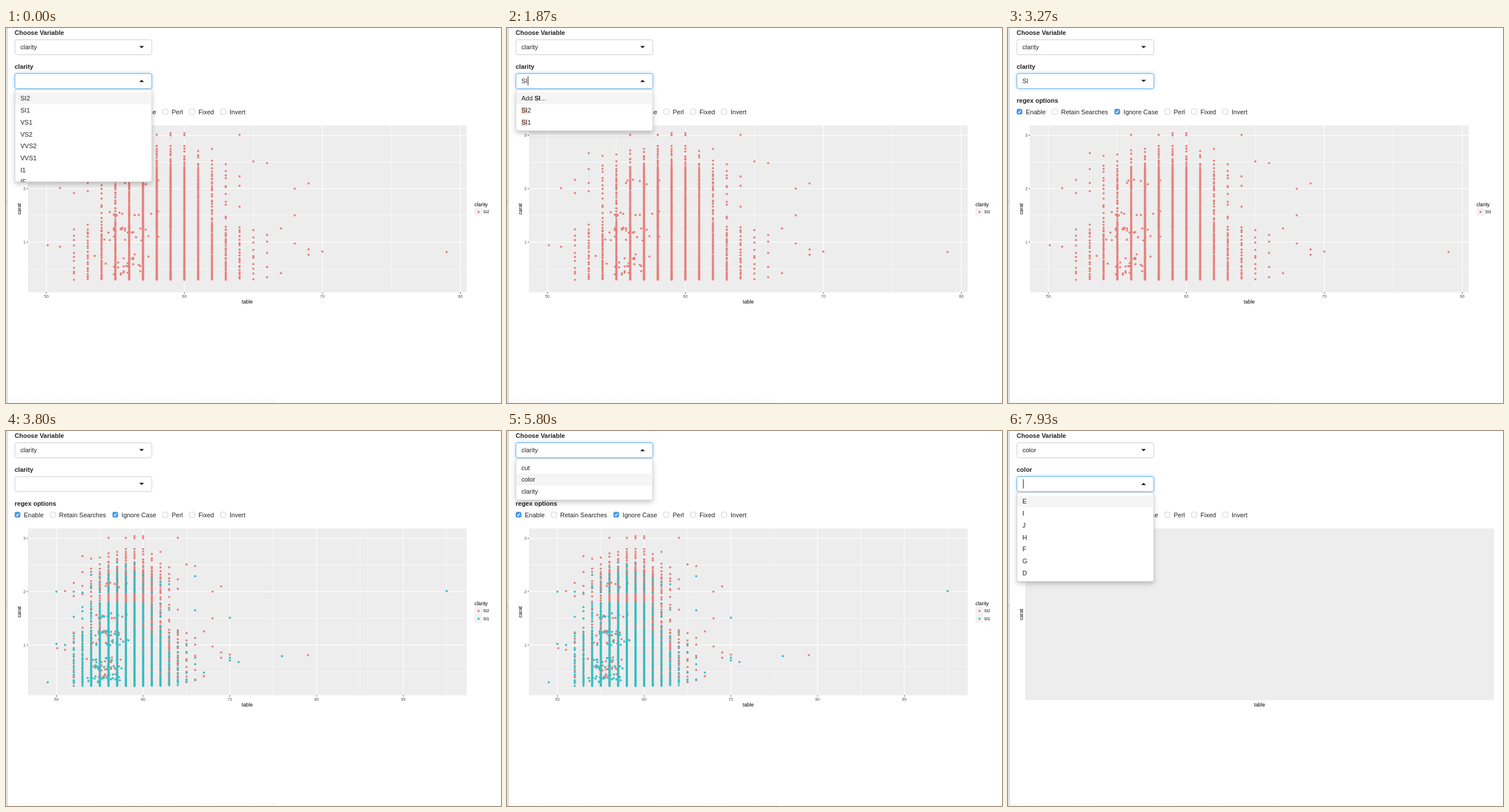
Recreate the animation shown at these times as an HTML page with a canvas. Size 859x652 px, loop 8 s.

```html
<!DOCTYPE html>
<html lang="en">
<head>
<meta charset="utf-8">
<title>Regex select</title>
<style>
html, body { margin: 0; width: 100%; height: 100%; overflow: hidden; background: #fff; }
canvas { display: block; }
</style>
</head>
<body>
<canvas id="stage" width="859" height="652"></canvas>
<script>
const W = 859, H = 652, LOOP = 8000;
const FONT = '"Liberation Sans", Arial, sans-serif';
const INK = '#222', RED = '#e8807b', TEAL = '#38c0c6', PANEL = '#ededed';
const stage = document.getElementById('stage').getContext('2d');

// Moments of the interaction, in ms
const T = { s: 1500, si: 1700, enter: 2700, apply: 3600, open: 5200, hover: 5700,
            pick: 6000, redraw: 6150, open2: 7450 };

let seed = 7;
function rnd() {
  seed = (seed * 16807) % 2147483647;
  return seed / 2147483647;
}

function text(c, str, x, y, opt = {}) {
  c.font = `${opt.bold ? 'bold ' : ''}${opt.size || 11}px ${FONT}`;
  c.fillStyle = opt.color || INK;
  c.textAlign = opt.align || 'left';
  c.textBaseline = 'alphabetic';
  c.fillText(str, x, y + (opt.size || 11) * 0.36);
  return c.measureText(str).width;
}

function rect(c, color, x, y, w, h) {
  c.fillStyle = color;
  c.fillRect(x, y, w, h);
}

function roundRect(c, x, y, w, h, r) {
  c.beginPath();
  c.roundRect(x, y, w, h, r);
}

function dot(c, color, x, y) {
  c.fillStyle = color;
  c.beginPath();
  c.arc(x, y, 1.9, 0, 7);
  c.fill();
}

// ---------- scatter data ----------

// Each carat band fills the whole-number tables along a bell curve.
function buildSeries({ color, centre, bands, clusters, strays, outliers }) {
  const pts = outliers.map(([table, carat]) => ({ table, carat, color }));
  for (const { from, to, peak, spread } of bands) {
    for (let table = 52; table <= 68; table++) {
      const n = Math.round(peak * Math.exp(-(((table - centre) / spread) ** 2)));
      for (let i = 0; i < n; i++) {
        const u = ((i + rnd()) / n) ** 1.2;
        pts.push({ table, carat: from + (to - from) * u, color });
      }
    }
  }
  for (let i = 0; i < strays; i++) {
    const table = 53.3 + Math.round((rnd() + rnd()) * 26) / 10;
    const carat = clusters[Math.floor(rnd() * clusters.length)] + rnd() * 0.1 - 0.03;
    pts.push({ table, carat, color });
  }
  return pts;
}

const si2 = buildSeries({
  color: RED, centre: 58.4, strays: 75,
  bands: [
    { from: 0.29, to: 1.27, peak: 95, spread: 4.4 },
    { from: 1.27, to: 1.97, peak: 75, spread: 2.9 },
    { from: 1.98, to: 2.4, peak: 42, spread: 3.1 },
    { from: 2.4, to: 2.75, peak: 10, spread: 3.2 }
  ],
  clusters: [0.4, 0.55, 0.7, 0.7, 1.05, 1.2, 1.2, 1.52, 2.1],
  outliers: [[50.1, 0.94], [51, 2.01], [51, 0.91], [56, 3.01], [58, 3.01], [59, 3.04],
    [59, 3], [60, 3.04], [60, 3], [64, 3.01], [58, 2.8], [59, 2.8], [60, 2.8], [65, 2.51],
    [66, 2.48], [68, 2], [68, 1.5], [69, 2.1], [69, 0.86], [69, 0.76], [70, 0.82], [79, 0.81]]
});

const si1 = buildSeries({
  color: TEAL, centre: 57.7, strays: 75,
  bands: [
    { from: 0.23, to: 0.75, peak: 62, spread: 4.5 },
    { from: 0.75, to: 1.28, peak: 54, spread: 4 },
    { from: 1.28, to: 1.48, peak: 14, spread: 2.5 },
    { from: 1.48, to: 1.8, peak: 32, spread: 3 },
    { from: 1.98, to: 2.35, peak: 16, spread: 2.9 },
    { from: 2.36, to: 2.58, peak: 3, spread: 2 }
  ],
  clusters: [0.32, 0.38, 0.55, 0.7, 1.02, 1.2, 1.54],
  outliers: [[49, 0.3], [50, 2], [50, 1.02], [51, 1], [52, 2], [66, 2.29], [66, 1.65],
    [70, 1.51], [70, 0.76], [70, 0.71], [71, 0.68], [76, 0.79], [95, 2.01]]
});

// Mix the drawing order, with the second series mostly in front
const both = [...si2, ...si1]
  .map(p => ({ p, key: rnd() + (p.color === TEAL ? 0.6 : 0) }))
  .sort((a, b) => a.key - b.key)
  .map(o => o.p);

// ---------- plots ----------

function axisTitles(c, x, y) {
  text(c, 'table', x, 476, { size: 8.8, align: 'center', color: '#000' });
  c.save();
  c.translate(23, y);
  c.rotate(-Math.PI / 2);
  text(c, 'carat', 0, 0, { size: 8.8, align: 'center', color: '#000' });
  c.restore();
}

function makePlot(points, x50, unit, lastTick, levels) {
  const layer = document.createElement('canvas');
  layer.width = W;
  layer.height = H;
  const c = layer.getContext('2d');
  const left = 38, top = 169.5, width = 761.5, height = 290;
  const px = t => x50 + (t - 50) * unit;
  const py = v => 464.7 - 92.7 * v;
  const tick = { size: 7, color: '#4d4d4d' };

  rect(c, PANEL, left, top, width, height);
  for (let t = 50; px(t) < left + width; t += 5) {
    const w = t % 10 ? 0.6 : 1.2;
    rect(c, '#fff', px(t) - w / 2, top, w, height);
  }
  for (let v = 0.5; v <= 3; v += 0.5) {
    const w = v % 1 ? 0.6 : 1.2;
    rect(c, '#fff', left, py(v) - w / 2, width, w);
  }
  for (const p of points) dot(c, p.color, px(p.table), py(p.carat));
  for (let t = 50; t <= lastTick; t += 10) {
    rect(c, '#333', px(t) - 0.5, top + height, 1, 2.2);
    text(c, String(t), px(t), 466.3, { ...tick, align: 'center' });
  }
  for (let v = 1; v <= 3; v++) {
    rect(c, '#333', left - 2.2, py(v) - 0.5, 2.2, 1);
    text(c, String(v), 34, py(v), { ...tick, align: 'right' });
  }
  axisTitles(c, 418.5, 314.5);

  const first = 319.7 - (levels.length - 1) * 6.8;
  text(c, 'clarity', 813, first - 13.2, { size: 8.8, color: '#000' });
  levels.forEach(([label, color], i) => {
    const y = first + i * 13.6;
    rect(c, '#f2f2f2', 813, y - 6.8, 13.6, 13.6);
    dot(c, color, 820, y);
    text(c, label, 828, y, { size: 7, color: '#000' });
  });
  return layer;
}

const plotOne = makePlot(si2, 70, 23.95, 80, [['SI2', RED]]);
const plotTwo = makePlot(both, 87.5, 15.05, 90, [['SI2', RED], ['SI1', TEAL]]);

function emptyPlot(c) {
  rect(c, PANEL, 30, 169.5, 813.5, 298.5);
  axisTitles(c, 436.5, 319);
}

// ---------- form ----------

function select(c, y, value, focus, open) {
  c.save();
  if (focus) {
    c.shadowColor = 'rgba(102,175,233,.7)';
    c.shadowBlur = 6;
  }
  roundRect(c, 15.5, y, 237.5, 26, 3);
  c.fillStyle = '#fff';
  c.fill();
  c.restore();
  c.strokeStyle = focus ? '#66afe9' : '#ccc';
  c.lineWidth = 1;
  c.stroke();
  text(c, value, 25, y + 13);

  const d = open ? -2 : 2, my = y + 12.8;
  c.fillStyle = INK;
  c.beginPath();
  c.moveTo(231.2, my - d);
  c.lineTo(239.4, my - d);
  c.lineTo(235.3, my + d);
  c.fill();
}

function caret(c, x, y) {
  rect(c, INK, Math.round(x), y + 5, 1, 16);
}

function option(c, item, y, term) {
  const i = term ? item.indexOf(term) : -1;
  if (i >= 0) {
    c.font = `11px ${FONT}`;
    const x = 25 + c.measureText(item.slice(0, i)).width;
    rect(c, '#f8d5c9', x, y - 6, c.measureText(term).width, 12.5);
  }
  text(c, item, 25, y);
}

function dropdown(c, top, items, active, term) {
  const row = 20.7, start = top + 4.7;
  const total = items.length + (term ? 1 : 0);
  const h = Math.min(total * row + 9.3, 160);
  c.save();
  c.shadowColor = 'rgba(0,0,0,.22)';
  c.shadowBlur = 9;
  c.shadowOffsetY = 4;
  roundRect(c, 15.5, top, 237.5, h, [0, 0, 3, 3]);
  c.fillStyle = '#fff';
  c.fill();
  c.restore();
  c.strokeStyle = '#d0d0d0';
  c.lineWidth = 1;
  c.stroke();

  c.save();
  c.clip();
  rect(c, '#f5f5f5', 16, start + active * row, 236.5, row);
  let y = start + row / 2;
  if (term) {
    let x = 25 + text(c, 'Add ', 25, y);
    x += text(c, term, x, y, { bold: true });
    text(c, '…', x, y);
    y += row;
  }
  for (const item of items) {
    option(c, item, y, term);
    y += row;
  }
  c.restore();
}

function checkbox(c, x, label, on) {
  roundRect(c, x - 4.5, 141, 9, 9, 2);
  c.fillStyle = on ? '#459ae9' : '#fff';
  c.fill();
  c.strokeStyle = on ? '#3f8fdc' : '#c2c2c2';
  c.lineWidth = 0.8;
  c.stroke();
  if (on) {
    c.strokeStyle = '#fff';
    c.lineWidth = 1.3;
    c.beginPath();
    c.moveTo(x - 2.3, 145.7);
    c.lineTo(x - 0.6, 147.7);
    c.lineTo(x + 2.4, 143);
    c.stroke();
  }
  return text(c, label, x + 11, 145.7);
}

const checks = ['Enable', 'Retain Searches', 'Ignore Case', 'Perl', 'Fixed', 'Invert'];
const checked = ['Enable', 'Ignore Case'];
const clarity = ['SI2', 'SI1', 'VS1', 'VS2', 'VVS2', 'VVS1', 'I1', 'IF'];
const colors = ['E', 'I', 'J', 'H', 'F', 'G', 'D'];
const variables = ['cut', 'color', 'clarity'];

function options(c) {
  text(c, 'regex options', 15, 126, { bold: true });
  let x = 20;
  for (const label of checks) x += checkbox(c, x, label, checked.includes(label)) + 27;
}

function page(c) {
  rect(c, '#fff', 0, 0, W, H);
  rect(c, '#e6e6e8', 0, 0, 2, H);
  rect(c, '#d0d0d2', 2, 0, 1, H);
  rect(c, '#c4c4c6', 0, 300, 1, 6);
  const fade = c.createLinearGradient(0, 642, 0, H);
  fade.addColorStop(0, '#fff');
  fade.addColorStop(1, '#f8f8f8');
  rect(c, fade, 3, 642, 467, 10);
}

const blink = (t, from) => (t - from) % 1000 < 500;

function draw(t) {
  const c = stage;
  const typed = t < T.s || t >= T.apply ? '' : t < T.si ? 'S' : 'SI';
  const listOpen = t < T.enter, lastOpen = t >= T.open2;
  const topOpen = t >= T.open && t < T.pick;
  const topFocus = t >= T.open && t < T.open2;

  page(c);
  if (t < T.apply) c.drawImage(plotOne, 0, 0);
  else if (t < T.redraw) c.drawImage(plotTwo, 0, 0);
  else emptyPlot(c);

  text(c, 'Choose Variable', 15, 8, { bold: true });
  select(c, 20.5, t < T.pick ? 'clarity' : 'color', topFocus, topOpen);
  text(c, t < T.redraw ? 'clarity' : 'color', 15, 67, { bold: true });
  select(c, 79.3, typed, t < T.apply || lastOpen, listOpen || lastOpen);
  options(c);

  if (listOpen) {
    dropdown(c, 107.4, clarity.filter(v => v.includes(typed)), 0, typed);
    const since = t < T.s ? -650 : t < T.si ? T.s : T.si;
    c.font = `11px ${FONT}`;
    if (blink(t, since)) caret(c, 25.5 + c.measureText(typed).width, 79);
  }
  if (topOpen) dropdown(c, 48.6, variables, t < T.hover ? 2 : 1, '');
  if (lastOpen) {
    dropdown(c, 107.4, colors, 0, '');
    if (blink(t, T.open2)) caret(c, 25.5, 79);
  }
}

const began = performance.now();
function tick() {
  draw((performance.now() - began) % LOOP);
  requestAnimationFrame(tick);
}
tick();
</script>
</body>
</html>
```
